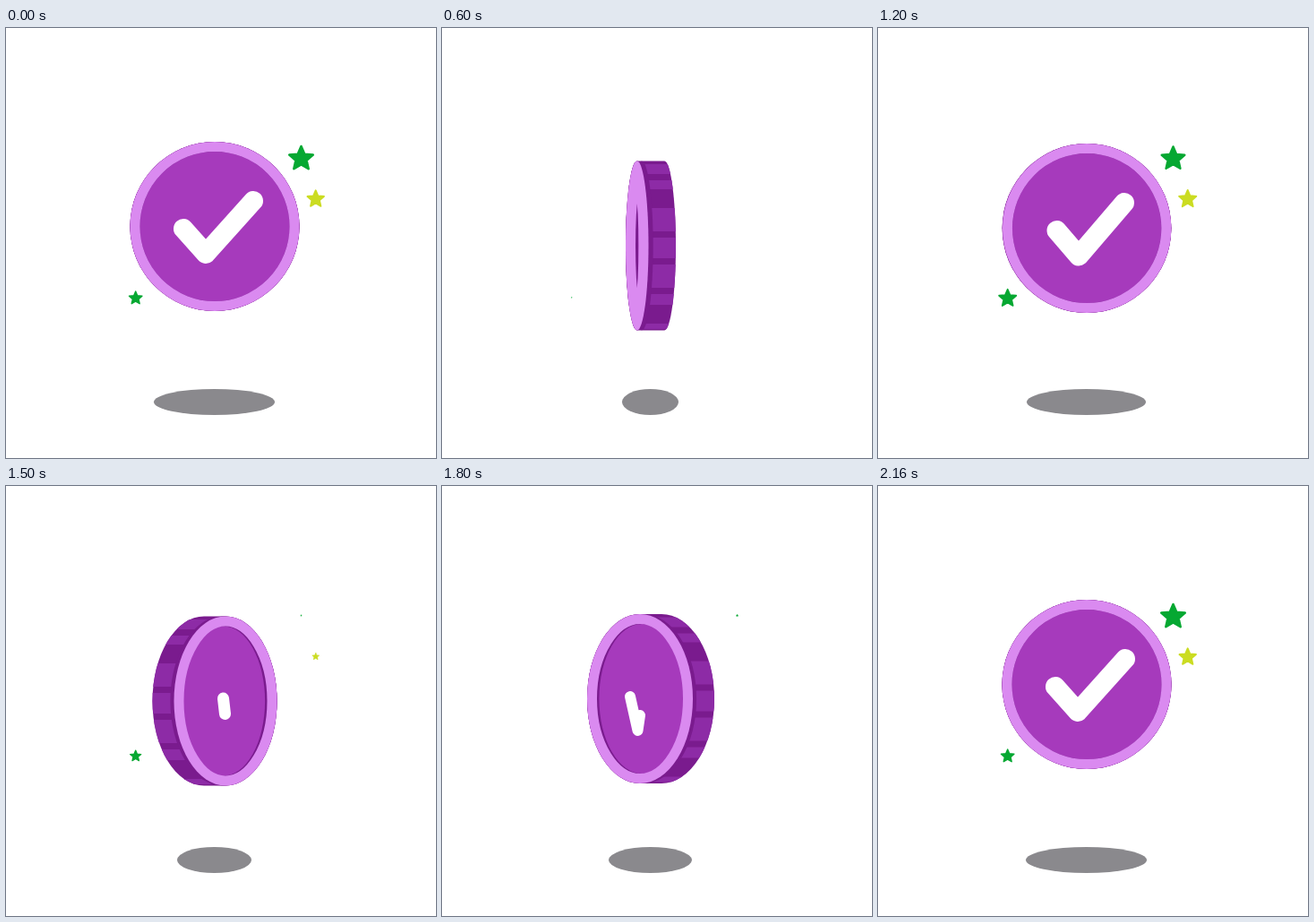
An HTML page with a canvas for the animation above (2.19 s loop, 480 px wide and 480 px high).

```html
<!DOCTYPE html>
<html lang="en">
<head>
<meta charset="utf-8">
<title>Spinning check coin</title>
<style>
  html, body { margin: 0; width: 100%; height: 100%; overflow: hidden; background: #fff; }
  canvas { display: block; width: 480px; height: 480px; }
</style>
</head>
<body>
<canvas id="stage" width="480" height="480"></canvas>
<script>
const ctx = document.getElementById('stage').getContext('2d');
const LOOP = 2190, SLOT = 30, STEPS = 31, TAU = Math.PI * 2;
const CX = 233, RY = 94.5, RING = 11;
const DARK = '#7a1b8e', BAND = '#8d2ba6', FACE = '#a63abc', EDGE = '#da8af0';

// Slots (in ms) where the pose is held instead of advancing
const HOLDS = [30, 210, 390, 570, 840, 1110, 1290, 1470, 1650, 1920];

// step, signed face radius, thickness, centre y, shadow radius
const COIN = [
  [0, 94.5, 0, 221.5, 67.5],
  [3, 94.2, 0.3, 223.5, 66.5],
  [8, 83, 10, 234, 56],
  [11, 57.5, 24, 240, 41.5],
  [16, -12.75, 30.5, 243, 31.5],
  [20, -59, 24, 237.5, 46.5],
  [23, -83, 10, 232, 57],
  [28, -94.2, 0.3, 223.4, 66.5],
  [31, -94.5, 0, 221.5, 67.5]
];

// step, three points relative to the coin centre, half stroke width
const CHECK_OUT = [
  [0, -35, 2.5, -10, 30.5, 43, -28.5, 11],
  [3, -33.5, 2.5, -9, 31, 42, -28.5, 11],
  [8, -11, 1, 4, 31, 34, -29, 9.7],
  [11, 9.5, -3, 11.5, 14.5, 11.5, 14, 6.5],
  [13, 16, 0, 16, 4, 16, 4, 0]
];
const CHECK_IN = [
  [17, -18, 10, -16, 24, -16, 24, 0],
  [20, -23, -2.5, -14.5, 35.5, -12, 18.5, 6],
  [23, -29, 1, -15, 31, 16, -29, 9.5],
  [28, -36, 2.5, -11, 31, 41.5, -28.5, 11],
  [31, -35, 2.5, -10, 30.5, 43, -28.5, 11]
];

const PULSE = [[0, 1], [3, 0.965], [8, 0.4], [11, 0.07], [14, 0],
  [17, 0], [20, 0.1], [23, 0.4], [28, 0.965], [31, 1]];

// x, y, radius, delay in steps, colour
const STARS = [
  [329.5, 144.5, 15, 0, '#06a832'],
  [345.7, 190, 10.9, 3, '#cbdc22'],
  [144.7, 300.8, 10.7, 5, '#06a832']
];

// Light stripes on the rim, relative to the coin centre
const BANDS = [[-91, -80], [-73, -63], [-42, -16], [-9, 14], [21, 47], [54, 66], [87, 93]];

// Smooth Hermite curve through keyed rows; returns every column after the key
function curve(rows, k) {
  let i = 0;
  while (i < rows.length - 2 && k >= rows[i + 1][0]) i++;
  const a = rows[i], b = rows[i + 1], span = b[0] - a[0];
  const u = (k - a[0]) / span;
  const slope = (j, c) => {
    const p = rows[j - 1], n = rows[j + 1];
    return p && n ? (n[c] - p[c]) / (n[0] - p[0]) : 0;
  };
  return a.slice(1).map((v, n) => {
    const c = n + 1, w = 1 - u;
    return v * (1 + 2 * u) * w * w + b[c] * u * u * (3 - 2 * u) +
      span * (slope(i, c) * u * w * w - slope(i + 1, c) * u * u * w);
  });
}

function oval(x, y, rx, ry) {
  ctx.beginPath();
  ctx.ellipse(x, y, rx, ry, 0, 0, TAU);
}

function fillOval(x, y, rx, ry, color) {
  oval(x, y, rx, ry);
  ctx.fillStyle = color;
  ctx.fill();
}

function drawRim(y, rx, front, back) {
  const left = Math.min(front, back), right = Math.max(front, back);
  ctx.save();
  ctx.beginPath();
  ctx.ellipse(left, y, rx, RY, 0, Math.PI / 2, Math.PI * 1.5);
  ctx.ellipse(right, y, rx, RY, 0, -Math.PI / 2, Math.PI / 2);
  ctx.closePath();
  ctx.fillStyle = DARK;
  ctx.fill();
  ctx.clip();
  ctx.fillStyle = BAND;
  for (const [top, bottom] of BANDS) ctx.fillRect(100, y + top, 270, bottom - top);
  fillOval(front + (back - front) * 0.17, y, rx, RY, DARK);
  ctx.restore();
}

function drawFace(x, y, rx, shift) {
  ctx.save();
  oval(x, y, rx, RY);
  ctx.clip();
  ctx.fillStyle = DARK;
  ctx.fillRect(x - rx - 1, y - RY - 1, rx * 2 + 2, RY * 2 + 2);
  if (rx > RING) fillOval(x + shift, y, rx - RING, RY - RING, FACE);
  oval(x, y, rx, RY);
  ctx.strokeStyle = EDGE;
  ctx.lineWidth = RING * 2;
  ctx.stroke();
  ctx.restore();
}

function drawCheck(k, y) {
  if (k > 13 && k < 17) return;
  const [ax, ay, bx, by, cx, cy, half] = curve(k <= 13 ? CHECK_OUT : CHECK_IN, k);
  if (half < 0.5) return;
  ctx.beginPath();
  ctx.moveTo(CX + ax, y + ay);
  ctx.lineTo(CX + bx, y + by);
  ctx.lineTo(CX + cx, y + cy);
  ctx.lineCap = ctx.lineJoin = 'round';
  ctx.lineWidth = half * 2;
  ctx.strokeStyle = '#fff';
  ctx.stroke();
}

function drawStar([x, y, size, delay, color], k) {
  const r = size * curve(PULSE, (k - delay + STEPS) % STEPS)[0];
  if (r < 0.2) return;
  const tip = r * 0.93;
  ctx.beginPath();
  for (let i = 0; i < 10; i++) {
    const d = i % 2 ? tip * 0.46 : tip, a = i * TAU / 10;
    ctx.lineTo(x + d * Math.sin(a), y + r * 0.095 - d * Math.cos(a));
  }
  ctx.closePath();
  ctx.lineJoin = 'round';
  ctx.lineWidth = r * 0.17;
  ctx.fillStyle = ctx.strokeStyle = color;
  ctx.fill();
  ctx.stroke();
}

function draw(ms) {
  const slot = Math.floor((ms % LOOP) / SLOT);
  const k = (slot - HOLDS.filter(h => h <= slot * SLOT).length) % STEPS;
  const [radius, depth, y, shadow] = curve(COIN, k);
  const side = radius < 0 ? -1 : 1, rx = Math.abs(radius);
  const front = CX + side * depth / 2, back = CX - side * depth / 2;

  ctx.fillStyle = '#fff';
  ctx.fillRect(0, 0, 480, 480);
  fillOval(232.5, 417.5, shadow, 14.5, '#8a898d');
  drawRim(y, rx, front, back);
  drawFace(front, y, rx, -side * depth * 0.1);
  drawCheck(k, y);
  for (const star of STARS) drawStar(star, k);
}

const start = performance.now();
function tick() {
  draw(performance.now() - start + 1);
  requestAnimationFrame(tick);
}
tick();
</script>
</body>
</html>
```
